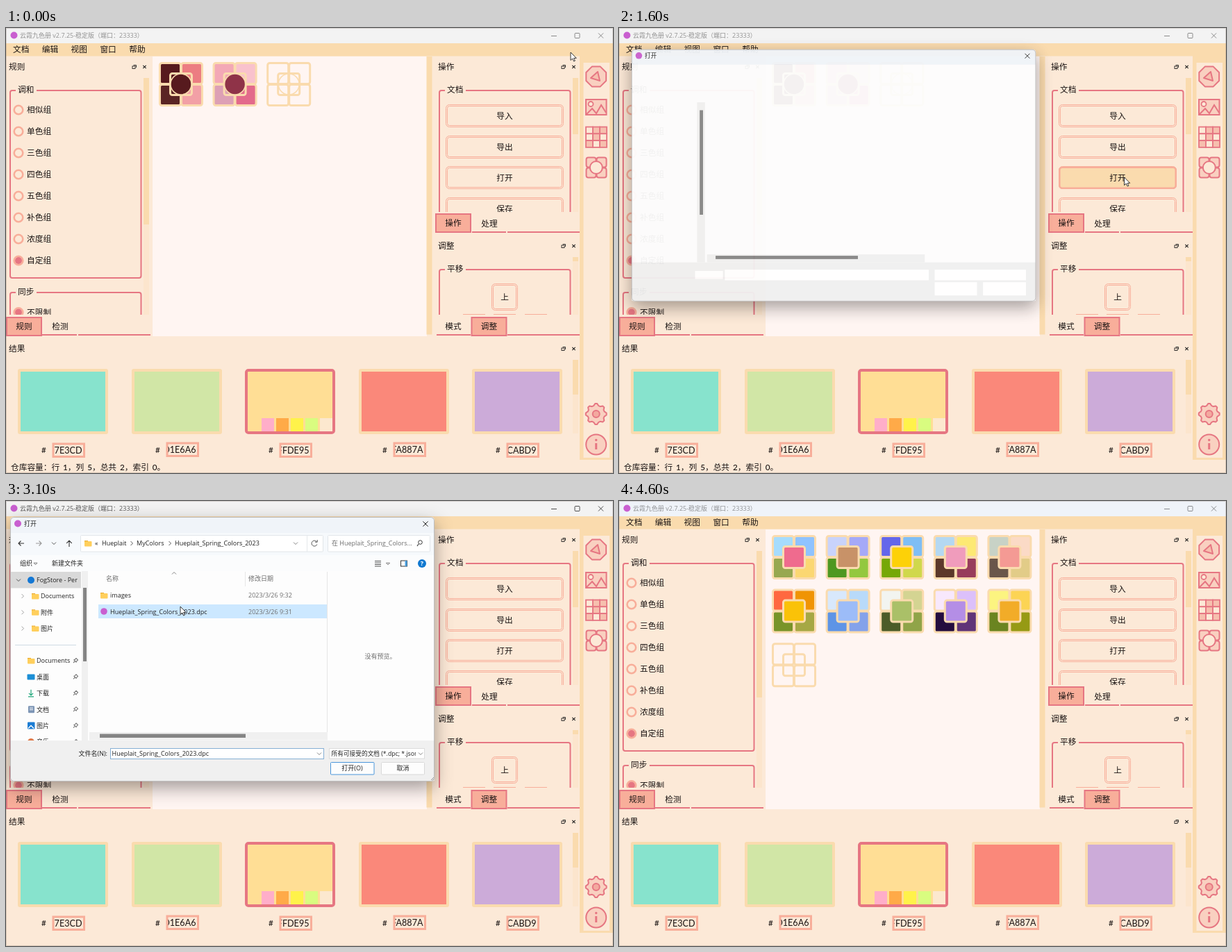
Animation, 874 px wide and 641 px high, one loop 4700 ms. Source, as an HTML page:

```html
<!DOCTYPE html>
<html lang="zh-CN">
<head>
<meta charset="utf-8">
<style>
html, body { margin: 0; width: 100%; height: 100%; overflow: hidden; background: #fce9d7; }
svg { display: block; }
#stage { width: 874px; height: 641px; }
text { white-space: pre; fill: #1a1413; }
.app { font: 500 11.7px Lato, "Noto Sans CJK SC", "Noto Sans CJK", sans-serif; word-spacing: 2px; }
.win { font: 9px "Open Sans", "Noto Sans CJK SC", "Noto Sans CJK", sans-serif; }
.win text { fill: #222; }
.win .dim { fill: #6d6d6d; }
#shade { filter: drop-shadow(0 9px 13px rgba(20, 15, 15, .4)); }
</style>
</head>
<body>
<svg id="stage" viewBox="0 0 874 641"></svg>
<script>
const LOOP = 4700, STEP = 100;
const BG = '#fce9d7', SAND = '#fadbae', ROSE = '#e67682', PEACH = '#f8ae9a', TRACK = '#fce5cd';
const BRAND = 'Hueplait', FOLDER = BRAND + '_Spring_Colors_2023';

// --- drawing helpers -------------------------------------------------
const rect = (x, y, w, h, fill = 'none', more = '') =>
  `<rect x="${x}" y="${y}" width="${w}" height="${h}" fill="${fill}" ${more}/>`;
const line = (d, color, w = 1, more = '') =>
  `<path d="${d}" fill="none" stroke="${color}" stroke-width="${w}" ${more}/>`;
const disc = (x, y, r, fill, more = '') => `<circle cx="${x}" cy="${y}" r="${r}" fill="${fill}" ${more}/>`;
const text = (x, y, s, more = '') => `<text x="${x}" y="${y}" ${more}>${s}</text>`;
const mid = (x, y, s, more = '') => text(x, y, s, 'text-anchor="middle" ' + more);
const pen = (color, w, r = 0) => `stroke="${color}" stroke-width="${w}" rx="${r}"`;
const group = (id, body, more = '') => `<g id="${id}" ${more}>${body}</g>`;
const clip = (x, y, w, h, body) =>
  `<svg x="${x}" y="${y}" width="${w}" height="${h}" viewBox="${x} ${y} ${w} ${h}">${body}</svg>`;
const cross = (x, y, r, color, w = 1) =>
  line(`M${x - r} ${y - r}l${2 * r} ${2 * r}m0 ${-2 * r}l${-2 * r} ${2 * r}`, color, w);
const chevron = (x, y, dir, color = '#444') => {
  const d = { down: 'm-3 -1.5l3 3l3 -3', up: 'm-3 1.5l3 -3l3 3', right: 'm-1.5 -3l3 3l-3 3' }[dir];
  return line(`M${x} ${y}${d}`, color, .9);
};
const ring = (n, radius, cx, cy, turn = 0) => Array.from({ length: n }, (_, k) => {
  const a = (k + turn) / n * 2 * Math.PI, r = radius(k);
  return (cx + r * Math.cos(a)).toFixed(1) + ',' + (cy + r * Math.sin(a)).toFixed(1);
}).join(' ');
const poly = (pts, fill, color = ROSE, w = 2) =>
  `<polygon points="${pts}" fill="${fill}" stroke="${color}" stroke-width="${w}" stroke-linejoin="round"/>`;

// --- main window -----------------------------------------------------
function dockHead(x, y, name, right) {
  return text(x, y + 4, name) + cross(right, y, 2.2, '#222', 1.1) +
    rect(right - 17.5, y - 1, 4, 3.5, 'none', pen('#222', .9)) +
    line(`M${right - 16} ${y - 2.5}h4v3.5`, '#222', .9);
}
function frame(x, y, w, h, name) {
  return rect(x, y, w, h, 'none', pen(ROSE, 2, 3)) + rect(x + 8, y - 3, 30, 6, BG) + text(x + 11, y + 3, name);
}
function radio(y, name, on) {
  return disc(18, y, 6.3, BG, `stroke="${PEACH}" stroke-width="2.6"`) +
    (on ? disc(18, y, 5, ROSE) : '') + text(30, y + 4.2, name);
}
function button(x, y, w, h, name) {
  return rect(x + .5, y + .5, w - 1, h - 1, 'none', pen(PEACH, 1, 5)) +
    rect(x + 2.5, y + 2.5, w - 5, h - 5, 'none', pen(PEACH, 1, 3)) + mid(x + w / 2, y + h / 2 + 4.3, name);
}
const tab = (x, y, name) => rect(x + 1, y + 1, 50, 26, PEACH, pen(ROSE, 2)) + mid(x + 26, y + 18, name);
const rule = (x1, x2, y) => line(`M${x1} ${y}H${x2}`, ROSE, 2);

function leftDock() {
  const names = ['相似组', '单色组', '三色组', '四色组', '五色组', '补色组', '浓度组', '自定组'];
  return dockHead(4, 56, '规则', 199.5) + rect(198, 72, 8, 341, TRACK) + rect(198, 72, 8, 211, SAND) +
    frame(6, 90, 188.5, 270, '调和') + names.map((n, i) => radio(118 + 31 * i, n, i == 7)).join('') +
    clip(0, 370, 198, 43, frame(6, 381, 188.5, 60, '同步') + radio(409.5, '不限制', true)) +
    tab(0, 416, '规则') + mid(78, 434, '检测') + rule(52, 102, 442) + rule(104, 208, 442);
}
function rightDocks() {
  const names = ['导入', '导出', '打开', '保存'];
  const hover = group('hover', rect(634.3, 200.8, 167.4, 30, SAND, pen(PEACH, 2.6, 4)) + mid(718, 220.3, '打开'));
  const stubs = [658, 702, 747].map(x => line(`M${x} 412.5h32`, PEACH, 1)).join('');
  return dockHead(622, 56, '操作', 817.5) + rect(816, 72, 8, 193, TRACK) + rect(816, 72, 8, 81, SAND) +
    clip(615, 80, 211, 185, frame(624, 90, 188.5, 200, '文档') +
      names.map((n, i) => button(633, Math.round(110 + 44.7 * i), 170, 33, n)).join('') + hover) +
    tab(618, 267, '操作') + mid(696, 286, '处理') + rule(671, 720, 294) + rule(722, 826, 294) +
    dockHead(622, 314, '调整', 817.5) + rect(816, 330, 8, 83, TRACK) + rect(816, 330, 8, 6, SAND) +
    clip(615, 338, 211, 75, frame(624, 348, 188.5, 100, '平移') + button(699, 368, 38, 39, '上') + stubs) +
    mid(644, 434, '模式') + tab(669.5, 416, '调整') + rule(620, 669, 442) + rule(722, 826, 442);
}
function results() {
  const hex = ['87E3CD', 'D1E6A6', 'FFDE95', 'FA887A', 'CCABD9'];
  const minis = ['#ffaec9', '#ffaa48', '#fff24a', '#d9fc80', '#fce8cf'];
  return dockHead(4, 462, '结果', 817.5) + rect(816, 478, 8, 106, TRACK) + rect(816, 478, 8, 50, SAND) +
    hex.map((c, i) => {
      const x = Math.round(17 + 163.6 * i), on = i == 2, up = i % 2;
      return rect(x + 2, 493, 126, 90, '#' + c, pen(on ? ROSE : SAND, 4, on ? 3 : 1)) +
        text(x + 34, 612 - up * .5, '#') +
        rect(x + 51, 599 - up, 44.5, 18.5, BG, pen(PEACH, 3)) +
        clip(x + 52.5, 600, 42, 16, text(x + 92.5, 612.5 - up * .5, c, 'text-anchor="end" font-size="12.6" font-weight="400"'));
    }).join('') + minis.map((c, i) => rect(368 + 21 * i, 562, 18, 19, c)).join('');
}
function toolbar() {
  const soft = '#f9d0c0', grid = [];
  for (let k = 0; k < 9; k++)
    grid.push(rect(835 + (k % 3) * 10, 142.5 + (k / 3 | 0) * 9.8, 10, 9.8, [1, 2, 4, 6, 8].includes(k) ? '#f6bfae' : BG, pen(ROSE, 1.8)));
  const petals = [0, 1, 2, 3].map(k =>
    rect(835.5 + (k % 2) * 15, 186.5 + (k >> 1) * 15, 14, 14, soft, pen(ROSE, 2, 3))).join('');
  return rect(826, 40, 48, 582, SAND) + rect(831.5, 50, 37.5, 569, BG) +
    poly(ring(8, () => 15.6, 849.7, 70, .5), soft) + poly('842,72 852,63 855,76', '#f6bfae') +
    rect(835, 103, 29.5, 22, soft, pen(ROSE, 2)) + disc(842, 109.5, 3.5, BG, pen(ROSE, 1.8)) +
    line('M836 124l8 -8l6 7l7 -12l7 11', ROSE, 2) +
    grid.join('') + petals + disc(849.8, 201, 9, BG, pen(ROSE, 2)) +
    poly(ring(32, k => k % 4 < 2 ? 15 : 12.3, 849.7, 556, -.5), soft) + disc(849.7, 556, 5, '#f3a99f', pen(ROSE, 2)) +
    disc(849.7, 600, 14.5, soft, pen(ROSE, 2)) + disc(849.7, 593.5, 1.7, ROSE) + line('M849.7 598v9', ROSE, 3);
}

// colours: top left, top right, bottom left, bottom right, centre
function tile(i, colors, round) {
  const x = 220 + 77.6 * (i % 5), y = 49 + 77.6 * Math.floor(i / 5);
  const c = colors ? colors.split(' ').map(v => '#' + v) : Array(5).fill('none');
  const cell = (dx, dy, s, fill) => rect(x + dx, y + dy, s, s, fill, pen(SAND, 3, 3));
  return cell(1.5, 1.5, 30, c[0]) + cell(32.5, 1.5, 30, c[1]) + cell(1.5, 32.5, 30, c[2]) + cell(32.5, 32.5, 30, c[3]) +
    (round ? cell(16.5, 16.5, 31, 'none') + disc(x + 32, y + 32, 15, c[4], pen(SAND, 1.5)) : cell(16.5, 16.5, 31, c[4]));
}
const before = ['571a1e ec7d82 5a2424 f2a0a6 571a1e', 'f3a8b6 f9c2cd dda0b5 e36a8b 8f3348'];
const after = [
  'a6dcfd 8fc3ff 97a850 fbd772 ef6b8e', 'c9d3fb a5a9f8 4f9820 93c83f c89268',
  '6466ea 7fbef5 76a806 d0d84c fdd108', 'b4d8f2 fde974 5c382a 983c5c f09cbc',
  'c8d2c6 fbdac6 6a564a e2cc88 f49a94', 'ff6840 f09404 789428 a6a844 fac208',
  'd8e8fc b8dafa 5e94e6 84a2ea 9cbcf8', 'f2f4f0 d4d492 4c5c28 90a448 aac068',
  'f8e8fc dcc0fa 240c3e 603478 b48ee6', 'fcf480 fcd454 6a8420 969a14 f2ac28'];
const tiles = (list, round) => [...list, ''].map((c, i) => tile(i, c, round)).join('');

function mainWindow() {
  const menu = ['文档', '编辑', '视图', '窗口', '帮助'];
  return rect(0, 0, 874, 641, BG) + rect(0, 0, 874, 22, '#f3f3f3', 'id="bar"') +
    disc(11.5, 10.5, 5, '#c95fd0') +
    group('title', text(20, 14, '云霞九色册 v2.7.25-稳定版（端口：23333）') +
      line('M785 11.5h8', '#111') + rect(819, 7.5, 7, 7, 'none', pen('#111', 1, 1)) + cross(856.5, 11, 3.6, '#111'), 'class="win"') +
    rect(0, 22, 874, 18.5, SAND) +
    `<g class="app">` + menu.map((m, i) => text(10 + 41.8 * i, 35, m)).join('') +
    rect(211, 41, 395, 403, '#fff5f2') + rect(605.5, 41, 8, 400.5, SAND) +
    group('old', tiles(before, true)) + group('new', tiles(after)) +
    leftDock() + rightDocks() + results() + toolbar() +
    text(7, 637, '', 'id="status"') + '</g>' +
    rect(.5, .5, 873, 640, 'none', 'stroke="#8a7a70" stroke-opacity=".3"');
}

// --- file dialog -----------------------------------------------------
const folder = (x, y) => rect(x - 5, y - 4, 5, 3, '#e8a92f') + rect(x - 5, y - 3, 10.5, 7.5, '#ffcf5c', 'rx="1"');
const pin = y => line(`M97 ${y + 3}l2.5 -2.5m-2 -2l4 4m-3 -3.5l2.5 -2.5l2.5 2.5l-2.5 2.5`, '#777', 1.1);
const scroll = (x, y, w, h) => rect(x, y, w, h, '#858585');

function navPane() {
  const icons = [
    y => folder(36, y), y => rect(30.5, y - 4, 11, 8, '#1c8fd6', 'rx="1"'),
    y => line(`M36 ${y - 5}v8m-3 -3l3 3l3 -3m-7 5h8`, '#1fa67a', 1.2),
    y => rect(32, y - 5, 9, 10, '#7d95b5', 'rx="1"') + line(`M34 ${y - 2}h5m-5 2.5h5`, '#fff'),
    y => rect(31, y - 5, 10.5, 10, '#1b7cd3', 'rx="1"') + line(`M32 ${y + 4}l4 -4l4 4`, '#fff', 1.4),
    y => disc(36, y, 5, '#e07a4a')];
  return clip(6, 101, 103, 244, rect(7, 102, 101, 23.5, '#d9d9d9') + chevron(18, 114, 'down') +
    disc(36, 114, 5, '#1478d4') + text(44, 117.3, 'FogStore - Per') +
    ['Documents', '附件', '图片'].map((n, i) => {
      const y = 137 + 23.3 * i;
      return chevron(24, y, 'right', '#999') + folder(42, y) + text(50, y + 3.3, n);
    }).join('') + line('M13 207.5h88', '#cfdbe4') +
    ['Documents', '桌面', '下载', '文档', '图片', '音乐'].map((n, i) => {
      const y = 230 + 23.4 * i;
      return icons[i](y) + text(44, y + 3.3, n) + pin(y);
    }).join('')) + rect(109, 101, 9, 244, '#f0f0f0') + scroll(111, 125, 5, 106);
}
function controls() {
  return rect(6.5, 46, 610, 32, '#f6f9fc') + rect(6.5, 78, 610, 23, '#fbfcfd') +
    rect(107.5, 49.5, 349, 23.5, '#fff', pen('#e2e6ea', 1, 1)) + rect(463.5, 49.5, 147, 23.5, '#fff', pen('#e2e6ea', 1, 1)) +
    line('M594 62l-2 3m2.3 -3.3', '#333', 1.1) + disc(596.5, 59.5, 2.8, 'none', pen('#333', 1)) +
    text(20, 93.3, '组织') + text(66, 93.3, '新建文件夹') +
    line('M40 89.2h5l-2.5 2.7z', '#333', .6) + line('M547.5 89.2h5l-2.5 2.7z', '#333', .6) +
    line('M531 86.5h9m-9 2.5h9m-9 2.5h9m-9 2.5h9', '#444', .9) +
    rect(568.5, 86, 9, 8, 'none', pen('#333', 1)) + rect(574.5, 86, 3, 8, '#4ba0e0') +
    disc(599, 90, 6, '#0f78d0') + mid(599, 93.3, '?', 'style="fill:#fff;font-weight:700"') +
    navPane() + rect(120, 333, 343, 11.5, '#f0f0f0') + scroll(135, 335.5, 210, 5.5) + rect(6.5, 345, 610, 58, '#f0f0f0') +
    text(146, 367.3, '文件名(N):', 'text-anchor="end"') +
    rect(150.5, 356.5, 307, 15, '#fff', pen('#86afd4', 1)) + chevron(451, 364, 'down', '#777') +
    rect(465.5, 356.5, 137, 14.5, '#fff', pen('#dcdcdc', 1)) +
    clip(467, 357, 123, 14, text(468.5, 367.3, '所有可接受的文档 (*.dpc; *.json)', 'font-size="8.7"')) + chevron(597, 364, 'down', '#777') +
    rect(467.5, 376.5, 62.5, 17.5, '#fdfdfd', pen('#4a96da', 1, 1)) + mid(498.5, 388.3, '打开(O)') +
    rect(540.5, 376.5, 62, 17.5, '#fdfdfd', pen('#d9d9d9', 1, 1)) + mid(571.5, 388.3, '取消') +
    line('M612 402l4 -4m-1.5 4l1.5 -1.5', '#999');
}
function listing() {
  return line('M26 61h-8m3.5 -3.5l-3.5 3.5l3.5 3.5M91 66v-9m-3.8 3.8l3.8 -3.8l3.8 3.8', '#333', 1.1) +
    line('M43 61h8m-3.5 -3.5l3.5 3.5l-3.5 3.5', '#999', 1.1) + chevron(69, 61, 'down') +
    folder(118, 61) + text(128, 64, '«') + text(138, 64.3, BRAND) + chevron(181, 61, 'right') + text(188, 64.3, 'MyColors') +
    chevron(236, 61, 'right') + text(243, 64.3, FOLDER) + chevron(417, 61, 'down', '#777') + line('M433.5 50v23', '#e5e8eb') +
    line('M447.5 59a4 4 0 1 0 .3 3.5m.4 -6.5v3.2h-3.2', '#555', 1) +
    text(469, 64.3, `在 ${BRAND}_Spring_Colors...`, 'class="dim"') +
    text(144, 115.3, '名称', 'class="dim"') + text(349, 115.3, '修改日期', 'class="dim"') + chevron(242, 104, 'up', '#777') +
    line('M344.5 102v21M462.5 102v231', '#e6e6e6') +
    rect(133, 126, 329, 20.5, '#e5f3ff', 'id="rowA"') + rect(133, 149, 329, 20, '#cce8ff', 'id="rowB"') +
    folder(141, 136) + text(150, 139.3, 'images') + text(349, 139.3, '2023/3/26 9:32', 'class="dim"') +
    group('plain', line('M137.5 154h4.5l2.5 2.5v8h-7zM142 154v2.5h2.5', '#888', .9)) + group('picked', disc(141, 159, 4.8, '#c95fd0')) +
    text(150, 162.5, FOLDER + '.dpc') + text(349, 162.5, '2023/3/26 9:31', 'class="dim"') +
    mid(539, 227, '', 'id="preview" class="dim"') + text(152.5, 367.3, '', 'id="file"');
}
function dialog() {
  const blanks = rect(105, 103, 12, 242, '#f0f0f0') + scroll(109, 115, 5, 158) + rect(120, 333, 329, 12, '#f0f0f0') +
    scroll(133, 335, 215, 5) + rect(6.5, 345, 610, 58, '#f0f0f0') +
    [[102, 358, 42, 12], [147, 356, 308, 16], [464, 356, 138, 16], [464, 375, 64, 20], [537, 375, 65, 20]]
      .map(b => rect(...b, '#fff')).join('');
  return rect(6, 23, 611, 381, '#fdfdfd', 'rx="5" id="shade"') +
    line('M6.5 46V28q0 -4.5 4.5 -4.5H612q4.5 0 4.5 4.5V46z', 'none', 0, 'style="fill:#f0f4f9"') +
    disc(17, 32.5, 5, '#c95fd0') + text(26, 36, '打开') + cross(604, 33, 3.6, '#222') +
    group('blank', blanks) + group('controls', controls()) + group('listing', listing()) +
    rect(6.5, 23.5, 610, 380, 'none', 'rx="5" stroke="#777" stroke-opacity=".45"');
}

stage.innerHTML = mainWindow() + group('dialog', dialog(), 'class="win"') +
  group('cursor', '<path d="M0 0V11.5L2.7 9L4.6 13L6.4 12.2L4.6 8.4H8.2z" fill="#fff" stroke="#222" stroke-width=".9"/>');

// --- timing ----------------------------------------------------------
const paths = {
  x: [[0, 813], [300, 747], [400, 747], [1000, 727.5], [1800, 727.5], [2100, 572], [2500, 276.5], [2700, 251], [3600, 251], [3900, 785], [4000, 836], [4100, 859]],
  y: [[0, 35], [300, 42], [400, 42], [1000, 215], [1800, 215], [2100, 190], [2500, 140], [2700, 152], [3600, 152], [3900, 138], [4000, 135], [4100, 132]],
  title: [[0, .46], [300, 1], [1000, 1], [1300, .46], [3000, .46], [3200, 1], [4500, 1], [4600, .46]],
  scale: [[1600, .953], [1700, 1], [3100, 1], [3200, .992], [3300, .974]],
  fade: [[1600, .95], [1700, 1], [3100, 1], [3200, .85], [3300, .49]],
  rowA: [[2300, 0], [2400, 1], [2700, 1], [2900, 0]],
  rowB: [[2700, 0], [2900, 1]]
};
function at(name, t) {
  const keys = paths[name], i = keys.findIndex(k => k[0] > t);
  if (i == 0) return keys[0][1];
  if (i < 0) return keys[keys.length - 1][1];
  const [t0, a] = keys[i - 1], [t1, b] = keys[i];
  return a + (b - a) * (t - t0) / (t1 - t0);
}
const el = id => document.getElementById(id);
const set = (id, name, value) => el(id).setAttribute(name, value);
const show = (id, on) => set(id, 'visibility', on ? 'inherit' : 'hidden');
const say = (id, s) => { el(id).textContent = s; };

function draw(t) {
  const within = (a, b) => t >= a && t < b, picked = t >= 2700;
  set('bar', 'fill', t < 100 || within(1600, 3200) ? '#f3f3f3' : '#eff3f9');
  set('title', 'opacity', at('title', t));
  show('hover', within(1100, 3100));
  show('old', t < 3200);
  show('new', t >= 3200);
  say('status', t < 3100 ? '仓库容量：行 1，列 5，总共 2，索引 0。'
    : within(3700, 3900) ? '仓库容量：行 3，列 5，总共 10，索引 5。' : '');

  const s = at('scale', t);
  set('dialog', 'visibility', within(1600, 3400) ? 'visible' : 'hidden');
  set('dialog', 'opacity', at('fade', t));
  set('dialog', 'transform', s == 1 ? '' : `translate(309.2 212.3) scale(${s}) translate(-311.5 -213.5)`);
  show('blank', t < 1800);
  show('controls', t >= 1800);
  show('listing', t >= 2200);
  set('rowA', 'opacity', at('rowA', t));
  set('rowB', 'opacity', at('rowB', t));
  show('plain', !picked);
  show('picked', picked);
  say('preview', picked ? '没有预览。' : '选择要预览的文件。');
  say('file', picked ? FOLDER + '.dpc' : '');

  show('cursor', t < 4200);
  set('cursor', 'transform', `translate(${at('x', t)} ${at('y', t)})`);
}

const start = performance.now();
let last = -1;
function tick() {
  const t = Math.floor((performance.now() - start) % LOOP / STEP) * STEP;
  if (t != last) draw(last = t);
  requestAnimationFrame(tick);
}
tick();
</script>
</body>
</html>
```
